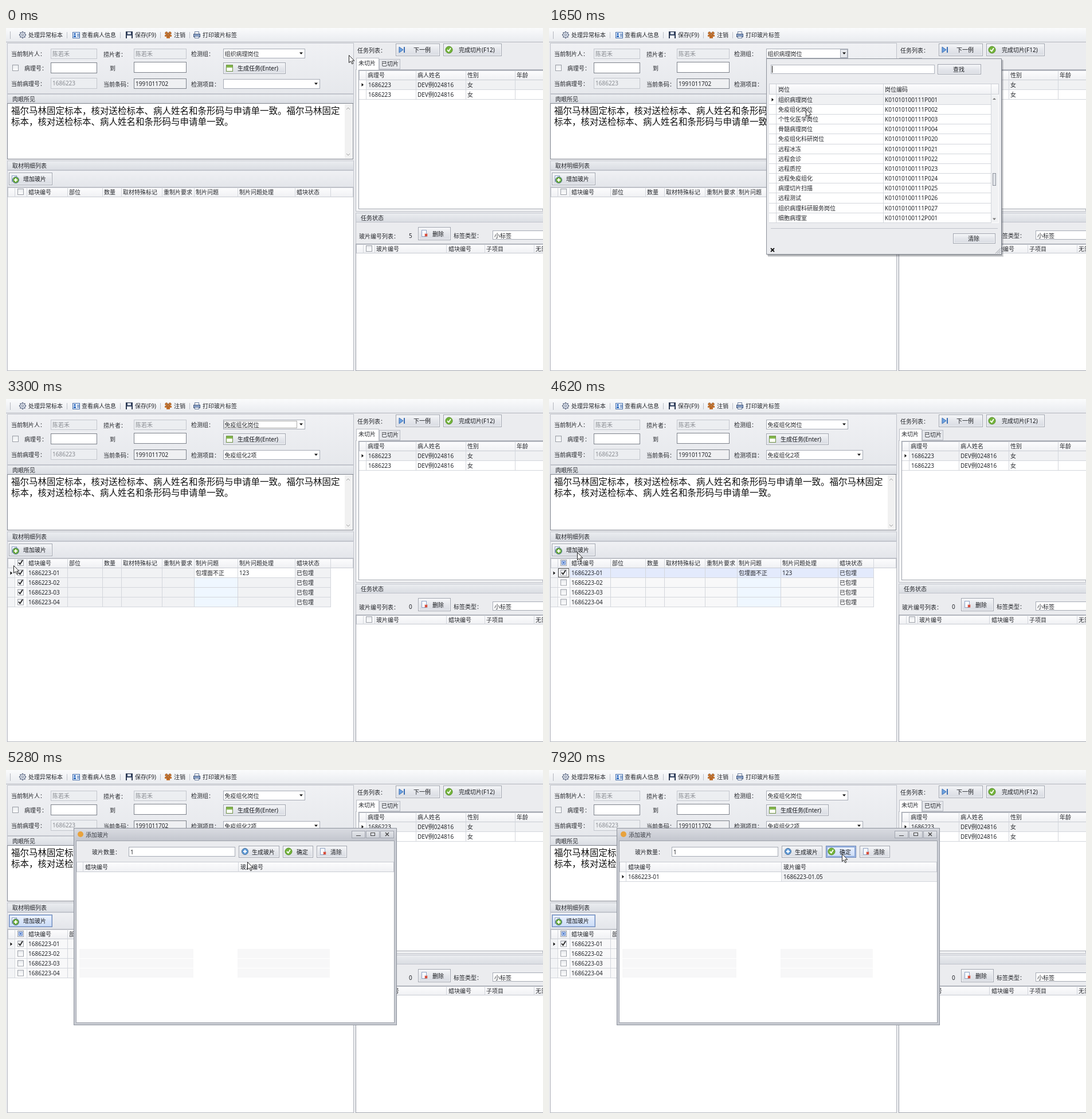
An HTML page with a canvas for the animation above (8 s loop, 937 by 598 pixels).

```html
<!DOCTYPE html>
<html lang="zh-CN">
<head>
<meta charset="utf-8">
<style>
html, body { margin: 0; width: 100%; height: 100%; overflow: hidden; background: #ebecef; }
canvas { display: block; }
</style>
</head>
<body>
<canvas id="stage" width="937" height="598"></canvas>
<script>
const c = document.getElementById('stage').getContext('2d');
const LOOP = 8000, FONT = '"Noto Sans", "Noto Sans CJK SC", "Noto Sans CJK", sans-serif';
const INK = '#24262b', EDGE = '#a9adb6', GRID = '#d3d6dc', PANEL = '#ebecef';
const USER = '陈若禾', PATIENT = 'DEV例024816', CASE = '1686223';

// Pointer stops: time, x, y (negative x hides it)
const STOPS = [
  [0, 598, 47], [330, 520, 42], [660, 514, 47], [990, 475, 90], [1320, 448, 131],
  [1650, 448, 141], [1980, 471, 128], [2640, 260, 276], [2970, -50, 0], [3300, 13, 290],
  [3630, 20, 288], [3960, 20, 290], [4290, 18, 299], [4620, 49, 267], [5280, 421, 160],
  [5610, 445, 137], [6600, 462, 140], [6930, 488, 142], [7260, 490, 144],
  [7590, 505, 145], [7920, 511, 146]
];

function rect(x, y, w, h, fill, stroke) {
  if (fill) {
    if (Array.isArray(fill)) {
      const g = c.createLinearGradient(0, y, 0, y + h);
      fill.forEach((color, i) => g.addColorStop(i / (fill.length - 1), color));
      fill = g;
    }
    c.fillStyle = fill;
    c.fillRect(x, y, w, h);
  }
  if (stroke) {
    c.strokeStyle = stroke;
    c.lineWidth = 1;
    c.strokeRect(x + .5, y + .5, w - 1, h - 1);
  }
}
const hline = (x, y, w, color = GRID) => rect(x, y, w, 1, color);
const vline = (x, y, h, color = GRID) => rect(x, y, 1, h, color);

function text(s, x, y, color = INK, size = 10) {
  c.font = `${size}px ${FONT}`;
  c.fillStyle = color;
  c.fillText(s, x, y + size * .37);
}
function poly(points, fill, stroke, width = 1) {
  c.beginPath();
  points.forEach(([x, y]) => c.lineTo(x, y));
  if (fill) { c.closePath(); c.fillStyle = fill; c.fill(); }
  if (stroke) { c.strokeStyle = stroke; c.lineWidth = width; c.stroke(); }
}
function disc(x, y, r, fill, stroke) {
  c.beginPath();
  c.arc(x, y, r, 0, 7);
  if (fill) { c.fillStyle = fill; c.fill(); }
  if (stroke) { c.strokeStyle = stroke; c.lineWidth = 1; c.stroke(); }
}
const down = (x, y, r = 3, color = '#111') => poly([[x - r, y - 1.5], [x + r, y - 1.5], [x, y + 2]], color);
const marker = (x, y) => poly([[x - 1.5, y - 3], [x + 2, y], [x - 1.5, y + 3]], '#111');

function button(x, y, w, h, label, tx, hot) {
  const fill = hot ? ['#f4f8ff', '#d9e5fa', '#cbdcf6'] : ['#f7f8fa', '#e4e6eb', '#d8dbe2'];
  rect(x, y, w, h, fill, hot ? '#6d86b4' : '#a2a6b0');
  rect(x + 1, y + 1, w - 2, h - 2, null, hot ? '#a9c1ea' : '#f5f6f8');
  text(label, tx, y + h / 2 + .5, '#17191d');
}
function field(x, y, w, h, value = '', disabled) {
  rect(x, y, w, h, disabled ? '#eceef1' : '#fff', disabled ? '#c3c6cd' : '#7d828b');
  text(value, x + 3, y + h / 2, disabled ? '#888b91' : INK);
}
function combo(x, y, w, value) {
  rect(x, y, w, 17, '#fff', '#a6abb5');
  text(value, x + 2.5, y + 9);
  down(x + w - 7, y + 8);
}
function check(x, y, state) {
  rect(x - 5, y - 5, 11, 11, ['#e8eaed', '#fff'], '#9a9ea6');
  if (state === 'on') poly([[x - 3, y], [x - .5, y + 3], [x + 4, y - 4]], null, '#222', 1.8);
  if (state === 'some') {
    rect(x - 3, y - 3, 7, 7, '#dbe6fa', '#4c78c8');
    rect(x - 1, y - 1, 3, 3, '#4c78c8');
  }
}
const headBand = (x, y, w, h) => rect(x, y, w, h, ['#fdfdfe', '#eff0f3'], '#c9ccd3');
function titleBand(x, y, w, h, label) {
  rect(x, y, w, h, ['#eceef1', '#d9dce2'], '#c0c3cb');
  text(label, x + 9, y + h / 2 + .5);
}

const icons = {
  ok(x, y) {
    disc(x, y, 6, '#74b43c', '#508b23');
    poly([[x - 3, y], [x - .5, y + 2.5], [x + 3, y - 3]], null, '#fff', 1.8);
  },
  remove(x, y) {
    rect(x - 5, y - 6, 9, 12, '#f8faff', '#8fa2c2');
    poly([[x + 1, y + 1], [x + 5, y + 5]], null, '#d9442f', 2);
    poly([[x + 5, y + 1], [x + 1, y + 5]], null, '#d9442f', 2);
  },
  plus(x, y, color) {
    disc(x, y, 5.5, color, '#4d7298');
    rect(x - 3, y - 1, 6, 2, '#fff');
    rect(x - 1, y - 3, 2, 6, '#fff');
  },
  gear(x, y) {
    for (let i = 0; i < 8; i++) {
      const a = i * Math.PI / 4;
      disc(x + 5 * Math.cos(a), y + 5 * Math.sin(a), 1.3, '#66728a');
    }
    disc(x, y, 4.5, '#dfe4ee', '#66728a');
    disc(x, y, 1.6, '#fff', '#66728a');
  },
  card(x, y) {
    rect(x - 6, y - 5, 13, 11, '#eef5ff', '#426caa');
    disc(x - 2, y - 1.5, 1.8, '#2f6cc0');
    rect(x - 4, y + 1, 4, 3, '#2f6cc0');
    for (const d of [-2, 0, 2]) hline(x + 2, y + d, 4, '#426caa');
  },
  disk(x, y) {
    rect(x - 6, y - 6, 12, 12, '#34435f', '#26324a');
    rect(x - 3, y - 5, 6, 4, '#dce3ef');
    rect(x - 4, y + 1, 8, 5, '#f7f9fc');
  },
  people(x, y) {
    for (const [dx, dy] of [[-3, -3], [3, -3], [0, 0]]) {
      disc(x + dx, y + dy, 2.2, '#d5823a', '#94531f');
      rect(x + dx - 3, y + dy + 3, 6, 3, '#c26f2c');
    }
  },
  printer(x, y) {
    rect(x - 4, y - 6, 8, 6, '#fff', '#667a9b');
    rect(x - 6, y - 2, 12, 6, '#8aa2c8', '#45597c');
    rect(x - 4, y + 2, 8, 4, '#fff', '#667a9b');
  }
};

function toolbar() {
  rect(0, 0, 937, 24, ['#fafbfc', '#e9ebef']);
  hline(0, 24, 937, '#b4b7be');
  vline(7, 6, 13, '#b4b7be');
  [['gear', 29, '处理异常标本', 39], ['card', 122, '查看病人信息', 132], ['disk', 215, '保存(F9)', 225],
   ['people', 283, '注销', 293], ['printer', 333, '打印玻片标签', 343]].forEach(([icon, x, label, tx]) => {
    icons[icon](x, 12);
    text(label, tx, 12);
  });
  for (const x of [106, 199, 269, 320]) vline(x, 7, 11, '#bcc0c8');
}

function form(t) {
  const changed = t >= 2310;
  rect(2, 26, 605, 89, ['#f0f1f4', '#e6e8ec'], '#bfc2ca');
  text('当前制片人：', 9, 45); field(78, 36, 81, 18, USER, true);
  text('捞片者：', 170, 46); field(223, 36, 92, 18, USER, true);
  text('检测组：', 323, 45);
  check(16, 69); text('病理号：', 32, 70); field(78, 60, 81, 19);
  text('到', 181, 70); field(223, 59, 92, 19);
  text('当前病理号：', 9, 97); field(78, 87, 81, 19, CASE, true);
  text('当前条码：', 170, 98);
  field(223, 88, 92, 18); rect(224, 89, 90, 16, '#eff0f2'); text('1991011702', 226, 97);
  text('检测项目：', 323, 98);

  combo(379, 36, 143, changed ? '免疫组化岗位' : '组织病理岗位');
  if (t >= 660 && !changed) {
    const hover = t < 990;
    rect(508, 37, 13, 15, hover ? '#c5d9f7' : '#e7e9ed', hover ? '#7f9fd0' : '#a6abb5');
    down(515, 44);
  }
  if (changed && t < 3960) {
    c.setLineDash([1, 1]);
    rect(380, 38, 128, 13, null, '#555');
    c.setLineDash([]);
  }
  combo(379, 89, 169, changed ? '免疫组化2项' : '');
  button(379, 60, 109, 20, '生成任务(Enter)', 404);
  rect(384, 64, 12, 12, '#fdfef5', '#6f9347');
  rect(385, 65, 10, 4, '#83b64b');
}

function findings() {
  titleBand(2, 115, 605, 17, '肉眼所见');
  rect(2, 131, 604, 98, '#fff', '#80858e');
  rect(591, 133, 13, 94, '#f1f1f1');
  poly([[594, 142], [597, 139], [600, 142]], null, '#a0a0a0');
  poly([[594, 219], [597, 222], [600, 219]], null, '#a0a0a0');
  const tail = '标本，核对送检标本、病人姓名和条形码与申请单一致。';
  text('福尔马林固定' + tail + '福尔马林固定', 9, 144, '#111', 15.5);
  text(tail, 9, 163, '#111', 15.5);
}

const COLS = [2, 15, 36, 107, 168, 201, 272, 328, 404, 504, 566];
const HEADS = ['蜡块编号', '部位', '数量', '取材特殊标记', '重制片要求', '制片问题', '制片问题处理', '蜡块状态'];

function blocks(t) {
  const all = t >= 2310 && t < 3960, one = t >= 4290;
  titleBand(2, 231, 605, 17, '取材明细列表');
  rect(2, 248, 605, 30, ['#f0f1f4', '#e3e5ea'], '#c3c6ce');
  button(5, 252, 76, 22, '增加玻片', 30, t >= 4950);
  rect(10, 257, 9, 11, '#f8faff', '#8fa2c2');
  icons.plus(17, 265, '#6eae3c');

  rect(2, 277, 605, 321, '#fff', '#b4b7be');
  headBand(3, 278, 603, 17);
  COLS.slice(1).forEach(x => vline(x, 278, 17));
  HEADS.forEach((label, i) => text(label, COLS[i + 2] + 3, 286));
  check(25, 285, all ? 'on' : t >= 4620 ? 'some' : '');
  if (t < 2310) return;

  for (let i = 0; i < 4; i++) {
    const y = 295 + i * 17, mid = y + 8.5;
    rect(36, y, 530, 17, all ? '#f1f2f4' : '#f8f8f9');
    if (i) rect(328, y, 76, 17, '#eff7ff');
    else if (!one || t >= 5280) rect(328, y, 176, 17, '#fff');
    else rect(36, y, t < 4620 ? 468 : 530, 17, '#e3eafc');
    rect(3, y, 12, 17, '#f3f4f6');
    COLS.slice(1).forEach(x => vline(x, y, 17));
    hline(3, y + 16, 563);
    check(25, mid - 1, all || one && !i ? 'on' : '');
    text(`${CASE}-0${i + 1}`, 39, mid);
    text('已包埋', 507, mid);
    if (!i) {
      marker(9, mid);
      text('包埋面不正', 331, mid);
      text('123', 407, mid);
    }
  }
  if (one && t < 5280) rect(16, 295, 19, 16, null, '#555');
}

function tasks(t) {
  text('任务列表：', 613, 39);
  button(680, 27, 77, 22, '下一例', 711);
  poly([[686, 33], [693, 38], [686, 43]], '#6fa3e0', '#3b6fb5');
  rect(694, 33, 2, 10, '#3b6fb5');
  button(763, 27, 102, 22, '完成切片(F12)', 790);
  icons.ok(773, 38);

  rect(610, 72, 327, 248, '#f7f8f9', '#b9bcc4');
  rect(651, 54, 37, 18, '#e6e8ec', '#b9bcc4');
  rect(611, 52, 40, 21, '#fff', '#b9bcc4');
  rect(612, 71, 38, 2, '#fff');
  text('未切片', 615, 61);
  text('已切片', 655, 62);
  rect(615, 73, 330, 243, '#fff', '#9da1aa');
  headBand(616, 74, 330, 17);
  ['病理号', '病人姓名', '性别', '年龄'].forEach((label, i) => text(label, [631, 718, 805, 891][i], 82));
  for (let i = 0; i < 2; i++) {
    const y = 91 + i * 17;
    if (!i) rect(628, y, 309, 17, '#f0f1f3');
    hline(616, y + 16, 321);
    text(CASE, 632, y + 8.5);
    text(PATIENT, 718, y + 8.5);
    text('女', 805, y + 8.5);
  }
  for (const x of [628, 715, 802, 888]) vline(x, 74, 51);
  marker(622, 99);

  titleBand(610, 322, 335, 17, '任务状态');
  vline(610, 339, 38, '#bfc2ca');
  text('玻片编号列表：', 616, 363);
  text(t < 2310 ? '5' : '0', 703, 362);
  button(719, 347, 57, 23, '删除', 744);
  icons.remove(730, 358);
  text('标签类型：', 781, 362);
  rect(849, 353, 100, 16, '#fff', '#a6abb5');
  text('小标签', 852, 362);
  rect(610, 376, 335, 222, '#fff', '#9da1aa');
  headBand(611, 377, 334, 16);
  for (const x of [623, 643, 768, 835, 921]) vline(x, 377, 16);
  check(633, 384);
  ['玻片编号', '蜡块编号', '子项目', '无需'].forEach((label, i) => text(label, [646, 772, 838, 924][i], 385));
}

const POSTS = [
  ['组织病理岗位', '1P001'], ['免疫组化岗位', '1P002'], ['个性化医学岗位', '1P003'], ['骨髓病理岗位', '1P004'],
  ['免疫组化科研岗位', '1P020'], ['远程冰冻', '1P021'], ['远程会诊', '1P022'], ['远程质控', '1P023'],
  ['远程免疫组化', '1P024'], ['病理切片扫描', '1P025'], ['远程测试', '1P026'],
  ['组织病理科研服务岗位', '1P027'], ['细胞病理室', '2P001']
];

function popup(t) {
  rect(382, 56, 411, 343, 'rgba(60,64,72,.22)');
  rect(381, 55, 410, 342, 'rgba(60,64,72,.3)');
  rect(379, 53, 411, 342, PANEL, '#8b9099');
  rect(387, 64, 286, 16, '#fff', '#b0b4bd');
  if (t >= 1650) vline(389, 66, 12, '#111');
  button(678, 63, 76, 18, '查找', 705);
  rect(384, 97, 401, 243, '#fff');
  headBand(384, 97, 401, 19);
  text('岗位', 400, 107);
  text('岗位编码', 586, 107);
  POSTS.forEach(([name, code], i) => {
    const y = 116.4 + i * 17.17, mid = y + 8.6;
    if (!i) rect(397, Math.round(y), 374, 17, '#f0f1f3');
    hline(384, Math.round(y + 16.5), 387);
    text(name, 400, mid);
    text('K0101010011' + code, 586, mid);
  });
  for (const x of [396, 583, 771]) vline(x, 98, 242);
  rect(772, 117, 12, 222, '#f0f1f3');
  poly([[774, 125], [777, 122], [780, 125]], '#777');
  down(777, 333, 3, '#777');
  rect(774, 253, 6, 22, '#e0e3e8', '#8f949e');
  marker(390, 125);
  hline(387, 349, 396, '#bfc2ca');
  button(705, 358, 74, 18, '清除', 731);
  poly([[387, 384], [393, 390]], null, '#111', 1.8);
  poly([[393, 384], [387, 390]], null, '#111', 1.8);
  for (const d of [3, 6, 9]) poly([[788 - d, 393], [788, 393 - d]], null, '#9a9ea6');
}

function dialog(t) {
  rect(118, 101, 564, 344, '#c9ccd3', '#8d929c');
  rect(119, 102, 562, 21, ['#d9dbe1', '#c3c6ce']);
  disc(130, 112, 5, '#e8a23c');
  text('添加玻片', 139, 113, '#3b3e45');
  for (const x of [603, 628, 653]) rect(x, 106, 24, 13, ['#e6e8ec', '#cdd0d7'], '#a2a6b0');
  hline(611, 114, 8, '#444');
  rect(636, 109, 8, 6, null, '#444');
  poly([[662, 109], [668, 115]], null, '#444', 1.4);
  poly([[668, 109], [662, 115]], null, '#444', 1.4);

  rect(122, 123, 556, 318, '#fff', '#9da1aa');
  rect(123, 124, 554, 36, PANEL);
  text('玻片数量：', 150, 143);
  rect(214, 134, 186, 17, '#fff', '#a6abb5');
  text('1', 217, 143);
  if (t >= 6930 && t < 7260 || t >= 7590 && t < 7920) vline(223, 136, 13, '#111');
  button(406, 132, 71, 21, '生成玻片', 429, t >= 5610 && t < 6930);
  icons.plus(417, 142, '#5f9bd8');
  button(483, 132, 53, 21, '确定', 507, t >= 6930);
  if (t >= 7920) rect(485, 134, 49, 17, null, '#7d9cd3');
  icons.ok(493, 142);
  button(542, 132, 53, 21, '清除', 566);
  icons.remove(553, 142);

  headBand(123, 160, 554, 18);
  text('蜡块编号', 138, 169);
  text('玻片编号', 409, 169);
  // Faint remains of the table underneath
  for (let y = 312; y < 362; y += 17) {
    rect(128, y, 199, 16, '#f7f7f8');
    rect(404, y, 161, 16, '#f7f7f8');
  }
  const made = t >= 5940;
  if (made) {
    rect(406, 178, 271, 16, '#f0f1f3');
    hline(123, 194, 554);
    marker(129, 186);
    text(`${CASE}-01`, 138, 186);
    text(`${CASE}-01.05`, 409, 186);
  }
  for (const x of [134, 405]) vline(x, 161, made ? 34 : 17);
}

function pointer(t) {
  const [, x, y] = STOPS.findLast(stop => t >= stop[0]);
  const shape = [[0, 0], [0, 13], [3, 10.3], [5.3, 15.2], [7.3, 14.3], [5.2, 9.6], [9.3, 9.6], [0, 0]];
  poly(shape.map(([dx, dy]) => [x + dx + .5, y + dy + .5]), '#fff', '#222');
}

function draw(t) {
  rect(0, 0, 937, 598, PANEL);
  toolbar();
  form(t);
  findings();
  blocks(t);
  tasks(t);
  if (t >= 660 && t < 1980) popup(t);
  if (t >= 4950) {
    c.save();
    if (t < 5280) {
      c.globalAlpha = .8;
      c.translate(400, 273);
      c.scale(.98, .98);
      c.translate(-400, -273);
    }
    dialog(t);
    c.restore();
  }
  pointer(t);
}

const start = performance.now();
function tick() {
  draw((performance.now() - start) % LOOP);
  requestAnimationFrame(tick);
}
tick();
</script>
</body>
</html>
```
